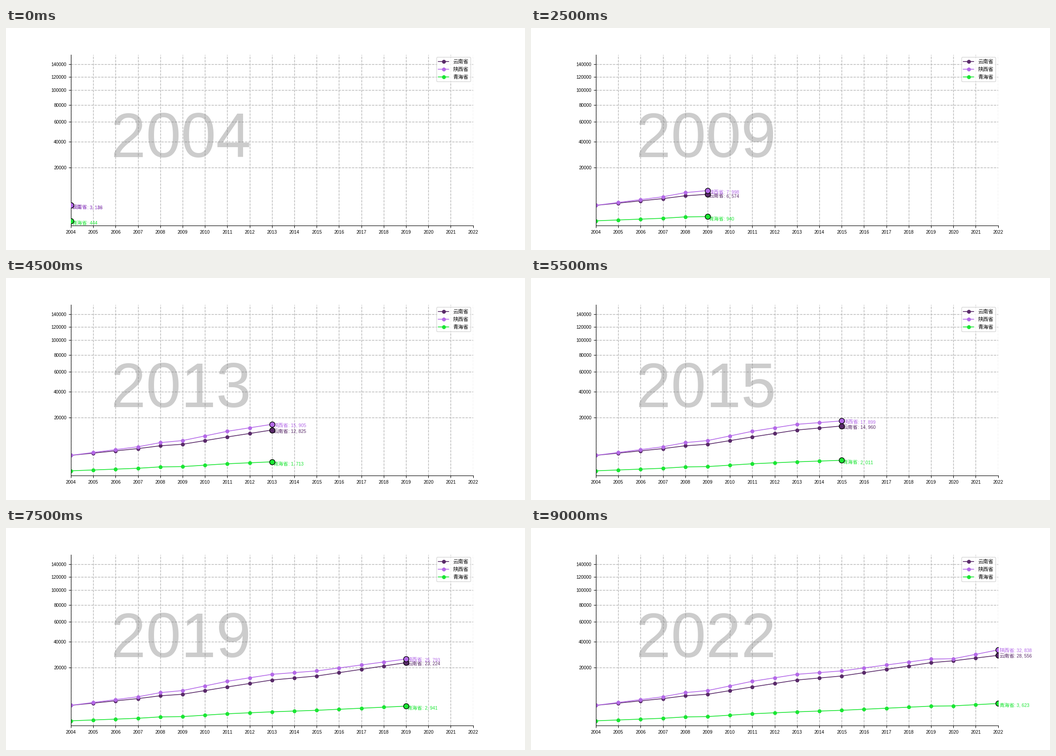
A matplotlib script for the animation above (9500 ms loop, 1143 by 490 pixels).

```python
import numpy as np
import matplotlib.pyplot as plt
from matplotlib.animation import FuncAnimation

CJK = "Noto Sans CJK JP"
plt.rcParams["font.family"] = ["Liberation Sans", CJK]
plt.rcParams["text.kerning_factor"] = 6  # evenly spaced digits

YEARS = np.arange(2004, 2023)
KEY_YEARS = [2004, 2007, 2008, 2009, 2011, 2013, 2015, 2019, 2020, 2022]
SERIES = [
    ("云南省", "#592a69",
     [3136, 5077, 6017, 6574, 9523, 12825, 14960, 23224, 24556, 28556]),
    ("陕西省", "#b469e8",
     [3142, 5682, 7178, 7998, 12175, 15905, 17899, 25793, 26014, 32838]),
    ("青海省", "#1ae633",
     [444, 720, 897, 940, 1370, 1713, 2011, 2941, 3010, 3623]),
]


def fill(keys):
    """Yearly values, straight between the key years on the root scale."""
    return np.rint(np.interp(YEARS, KEY_YEARS, np.sqrt(keys)) ** 2).astype(int)


fig, ax = plt.subplots(figsize=(1143 / 100, 490 / 100), dpi=100)
fig.subplots_adjust(left=0.125, right=0.9, bottom=0.11, top=0.88)
ax.set_yscale("function", functions=(lambda v: np.sqrt(np.maximum(v, 0)), np.square))
ax.set_xlim(2004, 2022)
ax.set_ylim(107, 157100)
ax.set_xticks(YEARS)
ax.set_yticks(range(20000, 140001, 20000))
ax.tick_params(labelsize=7.2)
ax.grid(ls="--", lw=1, color="#b5b5b5")
ax.set_axisbelow(True)
ax.spines[["top", "right"]].set_visible(False)

year_text = ax.text(0.1, 0.4, "", transform=ax.transAxes, fontsize=100,
                    color="gray", alpha=0.4)


def label(color, dx, size, family):
    """Text hung from a data point, shifted by dx points."""
    return ax.annotate("", (2004, 1000), xytext=(dx, -6.5), textcoords="offset points",
                       color=color, fontsize=size, family=family, annotation_clip=False)


rows = []
for name, color, keys in SERIES:
    values = fill(keys)
    line, = ax.plot([], [], "o-", color=color, lw=1.2, ms=5.2, label=name)
    head = ax.scatter([2004], [values[0]], s=72, color=color, edgecolor="black",
                      linewidth=1, zorder=5)
    province = label(color, 0, 8, CJK)
    province.set_text(name)
    amount = label(color, 24, 7.2, "Liberation Sans")
    rows.append((values, line, head, province, amount))

ax.legend(loc="upper right", prop={"family": CJK, "size": 8.2})


def update(i):
    year = YEARS[i]
    year_text.set_text(str(year))
    for values, line, head, province, amount in rows:
        value = values[i]
        line.set_data(YEARS[:i + 1], values[:i + 1])
        head.set_offsets([(year, value)])
        province.xy = amount.xy = (year + 0.05, value * 1.05)
        # punctuation plus a space is as wide as one digit
        amount.set_text(": " + f"{value:,}".replace(",", ", "))


anim = FuncAnimation(fig, update, frames=len(YEARS), init_func=lambda: update(0),
                     interval=500, repeat=True, repeat_delay=0, blit=False)
plt.show()
```
